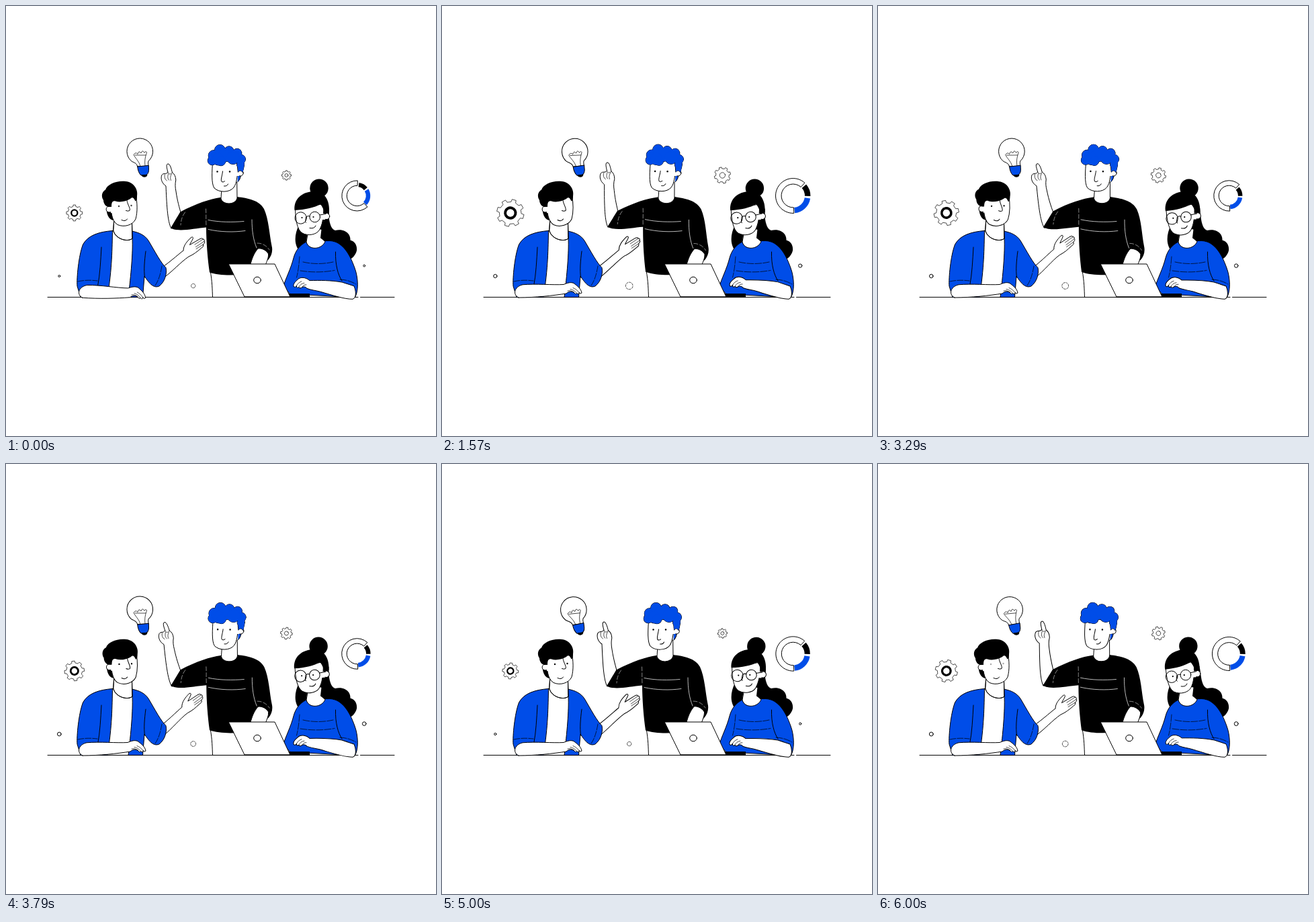
Write an HTML page that moves like this. It is 640 px wide and 640 px high and loops after 6.07 s.

```html
<!DOCTYPE html>
<html lang="en">
<head>
<meta charset="utf-8">
<title>Team at a desk</title>
<style>
html, body { margin: 0; width: 100%; height: 100%; overflow: hidden; background: #fff; }
svg { display: block; width: 100vw; height: 100vh; }
path, circle, ellipse { vector-effect: non-scaling-stroke; }
.w { fill: #fff; stroke: #000; }
.b { fill: #004de8; stroke: #000; }
.k { fill: #000; stroke: none; }
.l { fill: none; stroke: #000; }
.d { fill: none; stroke: #fff; stroke-width: .8; }
.e { fill: #000; stroke: none; }
.thin { stroke-width: .7; }
</style>
</head>
<body>
<svg viewBox="0 0 640 640" stroke-width="1" stroke-linecap="round" stroke-linejoin="round">
  <path class="l" d="M62 433.4H524M527.5 433.4H578"/>

  <!-- floating symbols -->
  <g id="gearA"><path class="w gear thin"/><circle class="k" r="11.4"/><circle r="6.8" fill="#fff"/></g>
  <g id="gearB"><path class="w gear thin"/><circle class="w thin" r="6"/></g>
  <circle id="dash" class="l thin" r="6.3" stroke-dasharray="3.2 2"/>
  <circle class="dot w" cx="79.3" cy="402"/>
  <circle class="dot w" cx="533.2" cy="386.6"/>
  <path id="ring" class="w"/>
  <path id="sliceA" class="k"/>
  <path id="sliceB" fill="#004de8"/>
  <g id="bulb">
    <path class="w" d="M195.5 238.5C194.500 233 190 233.500 186 230.300A19.300 19.300 0 1 1 212 230.800C211 233.500 211.800 236 212 238Z"/>
    <path class="l thin" d="M200 238C198 231 192 226 190 221.500Q193 216.500 196 220.500Q197.500 214 201 219Q203 213 206 218.500Q208 215 209.500 218C207 225 206 231 207 238M192 222H208"/>
    <path class="b" d="M195.700 239L212.300 237.300L212.500 244.500Q212 250.500 208 251.500L201 252Q196.500 248 195.700 239Z"/>
    <path class="k" d="M201.500 251.500L210.500 250.700Q210 254.700 206 254.800Q202 254.500 201.500 251.500Z"/>
  </g>

  <!-- standing man -->
  <path class="w" d="M304 394C307 410 307 422 307.500 433.400H370V390Z"/>
  <g id="man">
    <g id="point">
      <path class="w" d="M246 331C240 322 239 290 238 268C231 263 230 256 232 251.500C234.500 248 238 251 241 247.500C239 240 238 235.600 241 235C244 234.600 246 242 247.500 248C251 250 252.500 254 252.800 259C251.500 265 251.800 270 253 276C255 290 258 300 260.500 309Z"/>
      <path class="l thin" d="M241 247.500C242 251 245 251 247.500 248M236.500 250.500C235.500 254 236 258 239.500 260M241.500 250C240 255 241 258 243 259.500M246.500 250C244 254 244.500 257.500 245.500 259.500"/>
    </g>
    <path class="k" d="M319 285C304 287 283 294 259.300 306.500L245 330.500C257 337 280 331 298 329.500C298 350 300 376 303 396.500C318 402 345 401 366 398L391 377C395 372 397.500 365 395.500 357C392 340 391 317 384 302C377 289 360 286 344 284Z"/>
    <path class="w" d="M375 361C381 360 388 364 390.500 369C391 375 388 380 386 386H363.500C366 376 369 368 375 361Z"/>
    <path class="d" d="M301 318.500C318 322 337 322 354 320.500M301 332.500C319 336.500 339 337 356 334.500M366 318C366 334 368 348 373 360" stroke-opacity=".9"/>
    <path class="d" stroke-dasharray="6 3" d="M297.500 302C298 310 297.500 318 298 328M266.500 307C262 313 260.500 319 260 326M374 353C382 353 388 357 392 363" stroke-opacity=".65"/>
    <path class="b" stroke="none" d="M342 246L350 246Q350 259 343.500 263Z"/>
    <path fill="#fff" d="M321 268L320 286.500C322 296 341 297 344 286L345 248Z"/>
    <path class="l" d="M320.800 274L320 286.500C322 296 341 297 344 286L343.700 262"/>
    <path class="w" d="M307.500 232C306.700 246 305.300 264 310 271C317 278 333 278 339 270C344 263 343 255 345.500 247L345 230Z"/>
    <circle class="w" cx="348.700" cy="248.500" r="4.600"/>
    <path fill="#fff" d="M341 244H347V253H343Z"/>
    <g id="curls"></g>
    <path class="l" d="M322.500 246C322 252 319 259 321 261.500Q323 263 325.500 260.800M324.500 268Q329 268.700 330.500 265"/>
    <g id="eyesMan"><circle class="e" cx="314.500" cy="246.500" r="1.250"/><circle class="e" cx="333" cy="246.500" r="1.250"/></g>
  </g>

  <!-- seated man -->
  <g id="offer">
    <path class="w" d="M222 396C240 385 257 369 264 364C264 356 270 350 275 345Q278 342.500 278.500 345.500C277 350 274.500 352 273.500 355.500L288 347Q293 344.500 293 347.300Q296 346.500 295 350.300Q297 351.500 293.500 355Q295 358 290.500 360.500C284 366 279 370 272 373C260 381 248 395 234 405Z"/>
    <path class="l thin" d="M293 347.300L281 355M295 350.300L282.500 358.500M293.500 355L283 361.500"/>
  </g>
  <path class="b" d="M158.500 334.500C139 336 122 341 114.500 355C108 372 105 405 106 417L111 433.400H203.500L206 402C212 411 219 421 228 417C236 411 240 399 238 389.500C231 383 222 366 212.500 350C207 341 198 337 187 335Z"/>
  <path class="w" d="M158.500 334.500C158 360 158 390 151 433.400H182C186 400 189 367 188 346L187 335Z"/>
  <path class="l" d="M142 359C141 378 140 399 136.500 417M208 365C206 380 205 393 206.500 404"/>
  <path class="l thin" d="M107 410Q120 407 136 409M232 387C230 399 227 409 222 416" stroke-dasharray="9 2"/>
  <path class="w" stroke="none" d="M161 315L159.500 334C163 347 181 352 188 346L187.500 320Z"/>
  <path class="l" d="M161 316L159.800 334C163 347 181 352 188 346L187.500 324"/>
  <g id="headA">
    <path class="k" d="M149.500 302C150 312 154 319 161 319L159 302Z"/>
    <path class="w" d="M156 288C155.500 305 157 320 166 325.500C176 330 189 326 193 317C196 306 195.500 293 193 280Z"/>
    <circle class="w" cx="153.600" cy="302.500" r="4.500"/>
    <path fill="#fff" d="M155 298H161V308H156Z"/>
    <path class="k" d="M155 299C148 300 145 293 145 289C141 283 143 276 148 273.500C151 265 165 259.500 178 261C190 262 197 273 195 283C195 287 194.500 290 192.500 290.500C190 285 188 284 185 287C179 291 169 292.500 163 290.500C158 289 157 293 157 299Z"/>
    <path class="l" d="M180 289.500C181 296 185.500 301 184 304.500Q181.500 306 178.500 304.500M172 318.500Q178 321.500 180.500 317"/>
    <g id="eyesA"><circle class="e" cx="168" cy="298" r="1.200"/><circle class="e" cx="186.500" cy="297" r="1.200"/></g>
  </g>
  <g id="restArm">
    <path class="w" d="M114 434C105 430 107 418 120 414.800C140 413 164 415.500 181 414.500C186 412.500 191 410.500 196 412.500C202 417 207 421 208 427Q206.500 429.500 204 426.500Q204 430.500 200.500 427.500Q199 430 196 426C192 424 188 425 185 428C165 431 140 434 114 434Z"/>
    <path class="l thin" d="M204 426.500C201 422.500 198.500 421 195 419.500M200.500 427.500C197.500 424 194.500 422 191 421.500M196 426C193 424 190 423 187 424"/>
  </g>

  <!-- woman -->
  <path class="k" d="M436 326C429 340 428 356 438 366L500 378.500C511 381 520 373 522 364C523 355 518 350 512.500 348.500C513 338 503 331 490 334C481 331 481 314 479 304Z"/>
  <path class="b" stroke="none" d="M447 351C437 356 431 364 428 375C424 391 416 406 412.500 418L423 428.500L519 434C525 426 524.500 404 519 390C512 370 503 356 490 351C484 349 478 349 473 350C467 362 450 363 447 351Z"/>
  <path fill="#fff" d="M449 334L447 351C450 364 470 363 475 350.500L468 345L470 328Z"/>
  <path class="l" d="M449 340L447 351C450 364 470 363 475 350.500L468.500 345M490.500 366C490 385 494 400 500 409"/>
  <path class="l thin" stroke-dasharray="10 2" d="M442 381Q464 386 487 381M438 394Q464 398 489 393.500M437 373C436 385 435 395 432.500 404M497 407Q510 407.500 521 414"/>

  <!-- laptop -->
  <path class="k" d="M418 428H452V433.800H418Z"/>
  <path class="w" d="M331.500 384H400L423 433H355.500Z"/>
  <path class="l" stroke-width="1.600" d="M355.500 433.200H423"/>
  <ellipse class="w" cx="374" cy="408" rx="5.300" ry="4.800"/>

  <g id="typeArm">
    <path class="w" d="M500 411C484 408 467 408 452 408.300C446 403 438 402.500 434 407C429 411 427 415 428.500 417.500Q430.500 419 432.500 416Q432.500 420.500 436 418Q437.500 421 441 418C444 417 446 417.500 448 420C454 422.500 461 423 468 425C485 430 504 436.500 516 436.300C522 434.500 521 423 518 417Z"/>
    <path class="l thin" d="M432.500 416C434 412.500 437 410.500 440 409.500M436 418C437.500 414.500 440 412.500 444 412M441 418C442 415.500 444 414.500 447 414.500"/>
  </g>
  <g id="headB">
    <circle class="k" cx="466" cy="271.300" r="13.700"/>
    <path class="k" d="M472 300L481 302Q482 322 474 334L466 332Z"/>
    <path class="w" d="M430.500 301C431 318 433 333 441 338C450 343 462 340 466 334C471 326 473 315 473 295Z"/>
    <circle class="w" cx="477" cy="313" r="4.700"/>
    <path fill="#fff" d="M470 309H475V318H470Z"/>
    <path class="k" d="M429.500 304C428 287 441 276 459 276C475 276 482 290 481 307L474 309C473 303 471 299 468 295C459 300 446 303 429.500 304Z"/>
    <g class="l"><circle cx="438.700" cy="315.500" r="8.700"/><circle cx="459.700" cy="314" r="7.800"/><path d="M447.400 313.500Q450 311.500 452 313M467.300 311L476 309.500M446.500 314C446 319 444.500 321 446.500 322.500M452 330.500Q459 332 461 327"/></g>
    <g id="eyesB"><circle class="e" cx="440.500" cy="315" r="1.100"/><circle class="e" cx="457.500" cy="314" r="1.100"/></g>
  </g>
</svg>
<script>
const LOOP = 6070, TAU = Math.PI * 2;
const $ = id => document.getElementById(id);
const all = sel => document.querySelectorAll(sel);
const polar = (r, a) => `${(r * Math.cos(a)).toFixed(2)} ${(r * Math.sin(a)).toFixed(2)}`;

// eased value between pairs of time and value
function keys(t, ...k) {
  for (let i = 2; i < k.length; i += 2) if (t < k[i]) {
    const u = (t - k[i - 2]) / (k[i] - k[i - 2]);
    return k[i - 1] + (k[i + 1] - k[i - 1]) * (1 - Math.cos(Math.PI * u)) / 2;
  }
  return k[k.length - 1];
}

function gearPath(outer, inner, teeth) {
  const step = TAU / teeth, pts = [];
  for (let i = 0; i < teeth; i++)
    for (const [r, f] of [[inner, -.27], [outer, -.19], [outer, .19], [inner, .27]])
      pts.push(polar(r, (i + f) * step));
  return 'M' + pts.join('L') + 'Z';
}

function sector(r, R, from, to) {
  const a = from * TAU / 360, b = to * TAU / 360, big = +(to - from > 180);
  return `M${polar(R, a)}A${R} ${R} 0 ${big} 1 ${polar(R, b)}L${polar(r, b)}A${r} ${r} 0 ${big} 0 ${polar(r, a)}Z`;
}

function addCurls() {
  const curls = [[307, 230, 6.8], [309, 222.5, 7.8], [318.5, 214.5, 8], [332, 216, 7.2], [344, 219, 6.8],
    [349.5, 228, 7], [349, 236, 5.5], [326, 222, 10], [316, 228, 9], [338, 226, 9.5], [320, 231, 6.8]];
  const draw = style => curls.map(([x, y, r]) => `<circle cx="${x}" cy="${y}" r="${r}" ${style}/>`).join('');
  const side = style => `<path d="M344 229H354.5Q355 240 352 247.500Q349 242.500 345.500 247Z" ${style}/>`;
  const line = 'stroke="#000"', fill = 'fill="#004de8"';
  $('curls').innerHTML = draw(line) + side(line) + draw(fill) + side(fill);
}

const place = (id, x, y, rot, s) => $(id).setAttribute('transform', `translate(${x} ${y}) rotate(${rot}) scale(${s})`);
const turn = (id, deg, x, y) => $(id).setAttribute('transform', `rotate(${deg} ${x} ${y})`);

function blink(id, t, first, period) {
  const d = Math.abs((t - first + period * 1.5) % period - period / 2);
  $(id).setAttribute('opacity', Math.min(1, Math.max(0, (d - 50) / 90)));
}

function render(t) {
  const size = keys(t, 0, .5, 500, .5, 2200, 1, 4550, .5, 5100, .5, 6400, .75);
  place('gearA', 101.8, 308, t / 100, size);
  place('gearB', 417.4, 252, -t / 100, size * .6);
  $('gearB').lastElementChild.setAttribute('r', 8.2);
  place('dash', 278.7, 416.5, t / 100, size);
  $('dash').setAttribute('stroke-dasharray', `${3.4 * size} ${2 * size}`);
  const dot = 2.2 + .75 * Math.cos(TAU * (t - 1200) / 2370);
  all('.dot').forEach(c => c.setAttribute('r', dot));

  const swell = keys(t, 0, 0, 400, 0, 1650, 1, 3500, 0, 5400, 1, 7100, 0);
  const spin = keys(t, 0, -40, 400, -40, 1350, 0);
  const grow = .87 + .13 * swell, slice = .76 + .24 * swell;
  place('ring', 522.5, 282.5, spin, grow);
  place('sliceA', 522.5, 282.5, spin, slice);
  place('sliceB', 522.5, 282.5, spin, slice);

  turn('bulb', keys(t, 0, 0, 1000, 0, 2400, -7, 3500, 0, 4100, 0, 5350, -7, 5700, -7, 6600, 0), 204.5, 251);
  turn('man', keys(t, 0, 0, 500, 0, 2000, 1.2, 2500, 1.2, 4300, 0, 5500, 0, 6300, .5), 350, 400);
  turn('point', keys(t, 0, 0, 1300, 1.5, 1500, 1.5, 3000, -4, 3500, -4, 5800, 1.5), 254, 321);
  turn('headA', keys(t, 0, 0, 1500, 0, 2430, 1.8, 3200, 1.8, 4300, 0), 174, 332);
  turn('offer', keys(t, 0, 0, 1000, 0, 2430, -3, 4400, -3, 5600, 0), 225, 405);
  turn('restArm', keys(t, 0, 4.5, 800, 0), 112, 426);
  turn('headB', keys(t, 0, 0, 1100, .8, 2430, -3.7, 4900, 1.5, 6100, -3.3), 460, 345);
  turn('typeArm', keys(t, 0, -.3, 1500, .5, 2900, .3, 4500, -.4, 6100, .4), 515, 432);

  blink('eyesMan', t, 430, 2000);
  blink('eyesA', t, 120 + 1450, 1450);
  blink('eyesB', t, 820, 1600);
}

all('.gear').forEach(g => g.setAttribute('d', gearPath(24, 19.5, 8)));
$('ring').setAttribute('d', sector(17.5, 26, 88, 312));
$('sliceA').setAttribute('d', sector(17.5, 26, -41, 1));
$('sliceB').setAttribute('d', sector(17.5, 26, 9, 84));
addCurls();

const start = performance.now();
(function tick() {
  render((performance.now() - start) % LOOP);
  requestAnimationFrame(tick);
})();
</script>
</body>
</html>
```
